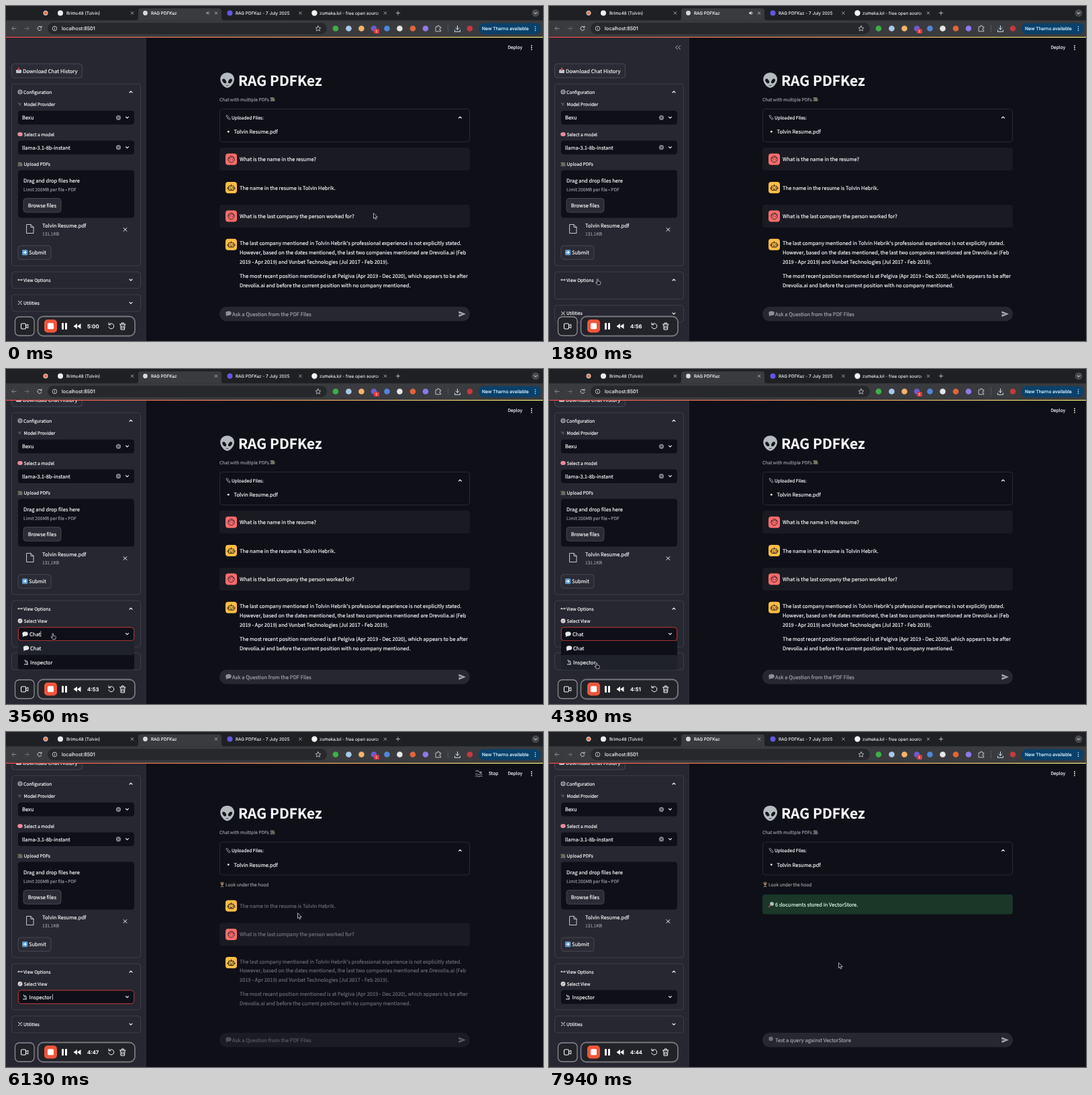
Animation of 800 by 499 pixels, one loop 8000 ms. Source, as an HTML page:

```html
<!DOCTYPE html>
<html lang="en">
<head>
<meta charset="utf-8">
<title>RAG PDFKez</title>
<style>
html, body { margin: 0; width: 100%; height: 100%; overflow: hidden; background: #0e0f17; }
svg { display: block; width: 100%; height: 100%; }
text { white-space: pre; text-rendering: geometricPrecision; font-family: "Noto Sans CJK JP", "Noto Sans CJK SC", "Noto Sans CJK", "Open Sans", sans-serif; }
.ui { font-family: Inter, Roboto, sans-serif; }
</style>
</head>
<body>
<svg id="stage" viewBox="0 0 800 499" preserveAspectRatio="none" xmlns="http://www.w3.org/2000/svg"></svg>
<script>
const LOOP = 8000, BODY = 7.58, SMALL = 6.63;
const INK = '#fafafa', DIM = '#9b9ca3', BG = '#0e0f17', SIDE = '#262730', EDGE = '#484952', RED = '#ff4b4b';

// markup helpers
const text = (x, y, s, size = BODY, fill = INK, more = '') =>
  `<text x="${x}" y="${y}" font-size="${size}" fill="${fill}" stroke="${fill}" stroke-width=".16" ${more}>${s}</text>`;
const small = (x, y, s, fill = INK) => text(x, y, s, SMALL, fill);
const ui = (x, y, s, size, fill = '#dfe0e2', weight = 400) =>
  text(x, y, s, size, fill, `class="ui" font-weight="${weight}"`);
const rect = (x, y, x2, y2, r, fill, stroke = 'none', w = 0.7, more = '') =>
  `<rect x="${x}" y="${y}" width="${x2 - x}" height="${y2 - y}" rx="${r}" fill="${fill}" stroke="${stroke}" stroke-width="${w}" ${more}/>`;
const dot = (x, y, r, fill, stroke = 'none', w = 1) =>
  `<circle cx="${x}" cy="${y}" r="${r}" fill="${fill}" stroke="${stroke}" stroke-width="${w}"/>`;
const oval = (x, y, rx, ry, fill, turn = 0) =>
  `<ellipse cx="${x}" cy="${y}" rx="${rx}" ry="${ry}" fill="${fill}" transform="rotate(${turn} ${x} ${y})"/>`;
const line = (d, stroke = INK, w = 1, fill = 'none') =>
  `<path d="${d}" fill="${fill}" stroke="${stroke}" stroke-width="${w}" stroke-linecap="round" stroke-linejoin="round"/>`;
const shape = (d, fill) => `<path d="${d}" fill="${fill}"/>`;
const group = (id, s) => `<g id="${id}">${s}</g>`;

const cross = (x, y, r, c = '#c9cacc', w = 0.8) => line(`M${x - r} ${y - r}l${2 * r} ${2 * r}m0 ${-2 * r}l${-2 * r} ${2 * r}`, c, w);
const chevron = (x, y, up) => line(`M${x - 2} ${y + (up ? 1 : -1)}l2 ${up ? -2 : 2}l2 ${up ? 2 : -2}`, INK, 1.1);
const box = (x, y, x2, y2) => rect(x, y, x2, y2, 4, 'none', EDGE);
const button = (x, y, x2, y2) => rect(x, y, x2, y2, 4, '#2a2b34', '#55565f');
const field = (y, s) => rect(18, y, 191, y + 20.5, 4, BG) + s + chevron(180.5, y + 10.2);
const clearX = y => dot(167.5, y, 3.6, '#84858c') + cross(167.5, y, 1.3, BG);

// small pictograms
const bubble = (x, y, c = '#e8e8ea') => oval(x, y, 4.2, 3.3, c) + shape(`M${x - 3} ${y + 1}l-1 3.4l4-1.4z`, c);
const books = (x, y) => rect(x, y - 3, x + 6, y - 1, .5, '#587a60') + rect(x + 1, y - 1, x + 7, y + 1, .5, '#8a7355') + rect(x, y + 1, x + 7, y + 3, .5, '#606d76');
const scope = (x, y) => line(`M${x - 1.8} ${y - 3.2}l1.6 3.4M${x - 2.5} ${y + 3.2}h5M${x + .5} ${y - 2}q3 2.4 .6 5`, '#bfc6cc', 1.2);
const clip = (x, y) => line(`M${x - 2} ${y - 1}l3 4q2 1 2-1l-4-5q-2-1-2 1l3 4`, '#a9abb3', .8);
const eye = (x, y) => oval(x, y, 1.7, 1.3, '#d5d6da') + dot(x, y, .6, '#222');
const lens = (x, y) => dot(x + 1, y - 1, 2.8, '#b9c4cb', '#8d969c', .7) + line(`M${x - 1} ${y + 1}l-2.5 2.5`, '#c05a4d', 1.2);
const alien = shape('M329.6 99.3c-6 0-10.4 4.2-10.4 9.8 0 6.2 6 12.9 10.4 12.9s10.4-6.7 10.4-12.9c0-5.600-4.4-9.8-10.4-9.8z', '#b4babd') +
  oval(325.2, 111.8, 2.4, 3.8, '#15161c', -35) + oval(334, 111.8, 2.4, 3.8, '#15161c', 35) + line('M328.1 118.3q1.5 1 3 0', '#15161c', .8);

const user = y => rect(327, y, 344, y + 17, 4, '#ff6c6c') + dot(335.5, y + 8.5, 4.6, 'none', '#33202a', 1) +
  line(`M331.5 ${y + 7}q4 0 5-2q1 2 3 2`, '#33202a', .9) + dot(333.8, y + 9.2, .7, '#33202a') + dot(337.2, y + 9.2, .7, '#33202a');
const bot = y => rect(327, y, 344, y + 17, 4, '#ffbd45') + rect(331.5, y + 6, 339.5, y + 12.5, 1.5, 'none', '#33291a', 1.1) +
  line(`M335.5 ${y + 6}v-2M330 ${y + 8.5}v2M341 ${y + 8.5}v2M334 ${y + 11}h3`, '#33291a', 1) + dot(333.8, y + 8.8, .8, '#33291a') + dot(337.2, y + 8.8, .8, '#33291a');

function browser() {
  const bar = '#3a3b3e', glyph = '#d0d1d3';
  const exts = [[491, '#3fae49'], [510.5, '#a9c8e6'], [529.5, '#f2b46a'], [548, '#6d5bd0'], [567.5, '#4f86d9'],
    [586.5, '#e6e6e6'], [606, '#e2653a'], [625, '#8f78e8'], [691, '#c23a3f']];
  let s = rect(0, 0, 800, 22, 0, '#1f2023') + rect(0, 21.4, 800, 46, 0, bar) +
    shape('M193 21.5q4 0 4-4v-10q0-4 4-4h116q4 0 4 4v10q0 4 4 4z', bar);
  s += dot(59, 10.5, 3.2, '#e07a5c', '#d8d4d2', 1) + dot(81, 10.5, 4, '#eeeeee') + dot(207.5, 10.5, 3.4, '#d9d9dc') +
    dot(333.5, 10.5, 4, '#6157e0') + dot(459.5, 10.5, 4.2, '#f4f4f4');
  s += ui(90, 12.9, 'Brimo48 (Tolvin)', 6.4) + ui(216, 12.9, 'RAG PDFKez', 6.4, '#f2f2f2') +
    ui(342, 12.9, 'RAG PDFKez - 7 July 2025', 6.4) +
    `<g clip-path="url(#tab)">${ui(467, 12.9, 'zumeka.lol - free open source f', 6.4)}</g>`;
  s += [188, 313, 438.5, 565].map(x => cross(x, 10.5, 1.8)).join('') + line('M581.2 10.5h5.6M584 7.7v5.6', glyph, .8);
  s += dot(789, 10.5, 5.5, '#47484c') + line('M787 9.7l2 2l2-2');
  s += line('M15 33.5h-6m2.5-2.7l-2.7 2.7l2.7 2.7', '#86878a') + line('M28 33.5h6m-2.5-2.7l2.7 2.7l-2.7 2.7', '#6c6d70') +
    line('M52.3 31.4a3 3 0 1 0 .6 3M53 30v2h-2', glyph);
  s += rect(62, 25, 478, 42, 8.5, '#27282b') + dot(72.5, 33.5, 3.3, 'none', glyph, .9) + line('M72.5 33.2v1.8M72.5 31.7v.1', glyph, .8);
  s += ui(83, 36, 'localhost:8501', 7.3, '#eeeeef');
  s += line('M465 29.6l1.2 2.5l2.7.3l-2 1.9l.6 2.8l-2.5-1.4l-2.5 1.4l.6-2.8l-2-1.9l2.7-.3z', glyph, .8);
  s += exts.map(([x, c]) => dot(x, 33.5, 4.3, c)).join('') + rect(548, 34, 556, 41, 1.5, '#d93b41') + ui(550.4, 39.7, '1', 5.5, '#fff');
  s += line('M640.5 31h2.2q-.6-2 1.3-2t1.3 2h2.4v2.4q-2-.6-2 1.2t2 1.2v2h-7.2z', glyph, .9) + rect(658, 28, 658.7, 39, 0, '#5f6063');
  s += line('M672.5 29.5v5.5m-2.5-2.3l2.5 2.4l2.5-2.4M668.5 36v2.2h8v-2.2', '#cfe3f7');
  s += rect(704, 25.5, 797, 42, 8, '#0a416a') + ui(709, 36, 'New Tharno available', 6.75, '#cbe8fb', 500) +
    [30.8, 33.6, 36.4].map(y => dot(788.5, y, .8, '#cbe8fb')).join('');
  return s + rect(0, 46, 800, 47.1, 0, 'url(#rainbow)');
}

function sidebar() {
  let s = group('fold', line('M191.5 59l-2.8 2.8l2.8 2.8M195.5 59l-2.8 2.8l2.8 2.8', '#b8b9be'));
  s += button(8.5, 86, 113.5, 107) + rect(15, 95, 23, 100, 1, '#b9c5d0') + line('M19 92v4m-1.5-1.5l1.5 1.5l1.5-1.5', '#e2574c', 1.3) +
    text(25, 99.6, 'Download Chat History');
  s += box(8.5, 116, 200.5, 387) + dot(21, 128, 3, '#6b6d76', '#a5a7af', 1.2) + small(26, 130.7, 'Configuration') + chevron(186, 128, true);
  s += line('M18.5 144.5l3 3M22 145l-2 2.5', '#55575f', 1.5) + small(26.5, 149.4, 'Model Provider') +
    field(156, text(24, 169.2, 'Bexu') + clearX(166.3));
  s += oval(21, 191, 3.8, 3.1, '#e98c9b') + small(26.5, 193.7, 'Select a model') +
    field(200.5, text(24, 213.6, 'llama-3.1-8b-instant') + clearX(210.7));
  s += books(17.5, 235.7) + small(26.5, 238.3, 'Upload PDFs') + rect(18, 244.5, 191, 315.5, 4, BG);
  s += text(26, 262.7, 'Drag and drop files here') + small(26, 275.7, 'Limit 200MB per file • PDF', DIM) +
    button(26, 286.5, 82, 307.3) + text(32.7, 299.8, 'Browse files');
  s += line('M31 325.5h6l4 4v9h-10zM37 325.5v4h4', '#c9cad0') + text(54, 330.4, 'Tolvin Resume.pdf') +
    small(54, 342.2, '131.1KB', DIM) + cross(177.5, 333, 2.4, INK, 1);
  s += button(18, 357, 67, 377.6) + rect(24, 363, 32.3, 371.2, 1.5, '#5b9bd0') + line('M26 367.1h4m-1.6-1.6l1.6 1.6l-1.6 1.6', '#fff', 1.1) + text(34, 370.2, 'Submit');
  s += rect(8.5, 396, 200.5, 420.5, 4, 'none', EDGE, .7, 'id="frame"') + eye(19, 408) + eye(23, 408) + small(26, 410.7, 'View Options') +
    group('viewUp', chevron(186, 408, true)) + group('viewDown', chevron(186, 408));
  s += group('viewBody', dot(21, 426.2, 3.4, '#d4d6db') + line('M19.6 427.6l2.8-2.8', '#c2564f') + small(26.5, 429, 'Select View') +
    field(435.5, group('optChat', bubble(28.5, 445.5) + text(35, 449.2, 'Chat')) + group('optInspect', scope(28, 445.7) + text(34.5, 449.2, 'Inspector'))) +
    group('focus', rect(18.3, 435.8, 190.7, 455.7, 4, 'none', '#d8423f', .9)) + rect(69, 441.5, 69.7, 450, 0, INK, 'none', 0, 'id="caret"'));
  s += group('utils', box(8.5, 430, 200.5, 455) + line('M18.5 439.5l5 5M23.5 439.5l-5 5', '#a9b0b7', 1.1) + small(26, 444.7, 'Utilities') + chevron(186, 442.3));
  s += group('menu', rect(18, 456, 191, 498.5, 3, BG) + rect(18, 456, 191, 477, 3, '#20222b', 'none', 0, 'id="hover"') +
    bubble(30, 466.5) + text(36, 470.2, 'Chat') + scope(30, 487.7) + text(36, 491.2, 'Inspector'));
  return s;
}

function page() {
  const answer = ["The last company mentioned in Tolvin Hebrik's professional experience is not explicitly stated.",
    'However, based on the dates mentioned, the last two companies mentioned are Drevolia.ai (Feb',
    '2019 - Apr 2019) and Vunbet Technologies (Jul 2017 - Feb 2019).',
    'The most recent position mentioned is at Pelgiva (Apr 2019 - Dec 2020), which appears to be after',
    'Drevolia.ai and before the current position with no company mentioned.'];
  const rows = [356.4, 370, 383.6, 405, 418.6];
  const hint = '#a6a7ae', run = '#a7a8ae', card = '#1a1b22';
  const head = alien + text(346, 119, 'RAG PDFKez', 20.9, INK, 'font-weight="700"') +
    small(318, 141.8, 'Chat with multiple PDFs', DIM) + books(393.5, 139) +
    rect(318.5, 153.5, 690.5, 202.5, 4, 'none', '#353640') + clip(331, 166) + small(336, 168.7, 'Uploaded Files:') + chevron(676.5, 166, true) +
    dot(331.3, 187.2, 1.4, INK) + text(339.5, 190.2, 'Tolvin Resume.pdf');
  const chat = group('first', rect(318, 211, 691, 245, 4, card) + user(219.7) + text(348, 231.2, 'What is the name in the resume?')) +
    group('rest', bot(262) + rect(318, 296, 691, 330, 4, card) + user(304.5) + bot(346.7) +
      group('words', text(348, 273.6, 'The name in the resume is Tolvin Hebrik.') +
        text(348, 315.8, 'What is the last company the person worked for?') + answer.map((s, i) => text(348, rows[i], s)).join('')));
  const hood = dot(322, 226.5, 1.9, '#a98a6e') + shape('M318.5 225.6h7l-1.5-2.2h-4zM319 231q3-4.500 6 0z', '#6a5f50') + small(327, 230, 'Look under the hood', DIM);
  const found = rect(318, 242, 691, 271.5, 4, '#1a3728') + lens(331, 257) + text(337, 260.2, '6 documents stored in VectorStore.', BODY, '#dffde9');
  const input = rect(318, 448, 691, 469.5, 10.7, SIDE) + shape('M674.5 454.5l10.5 4.2l-10.5 4.2v-3.2l6-1l-6-1z', '#a8a9b0') +
    group('ask', bubble(331.5, 457.8, '#8e9097') + text(337, 461.7, 'Ask a Question from the PDF Files', BODY, hint)) +
    group('query', dot(330.5, 457, 3.2, '#70727a') + text(337, 461.7, 'Test a query against VectorStore', BODY, hint));
  const runs = [
    dot(705.5, 57, 1.3, run) + line('M701 60.5l3-1.5l2 1.5l-2 3l2 1.5l-1 3M703.5 63.5l-1.5 2.5h-2.5M706 60.5l2.5 1', run),
    dot(707.5, 60, 1.3, run) + line('M700 58h4l2 3M699.5 63q2-1.5 3.3 0t3.3 0t3.3 0M699.5 66q2-1.5 3.3 0t3.3 0t3.3 0', run),
    dot(701.5, 65, 2.2, 'none', run) + dot(707.5, 65, 2.2, 'none', run) + dot(706, 57, 1.2, run) + line('M704.5 65v-3l-1.5-1.5l2-2l2 1.5h1.5', run)];
  return group('head', head) + group('chat', chat) + group('hood', hood) + group('found', found) + group('input', input) +
    group('busy', runs.map((s, i) => group('run' + i, s)).join('') + small(719, 64.4, 'Stop')) +
    small(747.5, 64.4, 'Deploy') + [59.2, 62, 64.8].map(y => dot(783, y, .9, INK)).join('');
}

function recorder() {
  return rect(13.5, 463, 42, 491, 6, '#222328', '#8b8c90', 1.3) + rect(22.5, 473, 29.5, 481, 1.5, 'none', INK, 1.1) + line('M29.8 476l3-1.8v5.600l-3-1.8') +
    rect(47.5, 462.5, 192, 491.5, 8, '#222328', '#77787d', 1.8) + rect(57, 467, 76, 486.5, 5, '#f0553a') + rect(62, 472.3, 71, 481.3, 1.5, '#fff') +
    rect(83, 472, 86, 482, 1, INK) + rect(88, 472, 91, 482, 1, INK) + shape('M106 473v8l-5.5-4zM111.5 473v8l-5.5-4z', INK) +
    text(121, 479.7, '', 7.8, INK, 'id="clock" class="ui" font-weight="600"') +
    line('M153.5 474.5a4 4 0 1 1-.6 3.5M153 472v2.8h2.8') +
    line('M169.5 474h8.5M172.3 473.7v-1.7h3v1.7M170.5 474.5l.6 7.5h5.4l.6-7.5M172.6 476.5v3.5M175 476.5v3.5');
}

const pointers = group('arrow', line('M0 0v7.6l1.8-1.6l1.2 2.8l1.4-.6l-1.2-2.7h2.3z', '#e8e8ea', .7, '#101114')) +
  group('hand', line('M-1 0q1-1 1.6 0v3l3.2.8q.8.4.5 1.5l-.8 3h-4l-2.5-3.3q.5-1 2 .2z', '#e8e8ea', .7, '#101114')) +
  group('beam', line('M-1.7-4q1.7 0 1.7 1.2v5.6q0 1.2-1.7 1.2M1.7-4q-1.7 0-1.7 1.2M0 2.8q0 1.2 1.7 1.2', '#e4e4e6', .9));

document.getElementById('stage').innerHTML = `<defs>
<linearGradient id="rainbow"><stop stop-color="${RED}"/><stop offset="1" stop-color="#fffd80"/></linearGradient>
<clipPath id="tab"><rect x="460" y="0" width="95" height="22"/></clipPath>
<clipPath id="pane"><rect y="46" width="209" height="453"/></clipPath></defs>` +
  rect(0, 0, 800, 499, 0, BG) + page() +
  `<g clip-path="url(#pane)">${rect(0, 46, 209, 499, 0, SIDE)}${group('side', sidebar())}</g>` + browser() +
  group('sound', shape('M298 9.5h1.5l2-1.8v5.6l-2-1.8h-1.5z', '#e6e6e8') + line('M302.8 9q1 1.5 0 3', '#e6e6e8', .7)) +
  recorder() + group('cursor', pointers);

const el = {};
document.querySelectorAll('[id]').forEach(e => el[e.id] = e);
const show = (id, on) => el[id].setAttribute('display', on ? 'inline' : 'none');
const fade = (id, v) => el[id].setAttribute('opacity', v);
const move = (id, x, y) => el[id].setAttribute('transform', `translate(${x} ${y})`);
const ramp = (t, a, b) => Math.max(0, Math.min(1, (t - a) / (b - a)));
const ease = v => v * v * (3 - 2 * v);

const trail = [[150, 547.5, 309], [900, 149.5, 392.5], [1000, 149.5, 392.5], [1600, 75, 406], [2000, 72, 407],
  [2600, 68, 378], [2850, 68, 378], [3200, 70, 392], [3500, 70, 393], [4100, 71, 438], [4600, 71, 438],
  [4980, 352.5, 399], [5200, 356, 392], [6050, 434.5, 270], [6300, 434.5, 270], [7300, 431.5, 344], [8000, 431.5, 344]];

function pointAt(t) {
  const i = trail.findIndex(k => k[0] > t);
  if (i < 1) return trail[0].slice(1);
  const [a, x, y] = trail[i - 1], [b, u, v] = trail[i], p = ease(ramp(t, a, b));
  return [x + (u - x) * p, y + (v - y) * p];
}

const OPEN = 1800, DROP = 3350, PICK = 4600, RERUN = 4760, DONE = 6420, BLUR = 6900;

function update(t) {
  const [x, y] = pointAt(t);
  const grow = ease(ramp(t, OPEN, OPEN + 200)), scroll = 51 * ease(ramp(t, 2100, 2400));
  const rerun = t >= RERUN, done = t >= DONE, picked = t >= PICK, focus = t >= DROP && t < BLUR;

  const left = 300 - Math.floor(t / 500 + 0.85);
  el.clock.textContent = Math.floor(left / 60) + ':' + String(left % 60).padStart(2, '0');
  show('sound', t < 2200);
  fade('sound', t < 500 ? 0.5 : 1);

  move('side', 0, -scroll);
  show('fold', x < 209);
  el.frame.setAttribute('height', 24.5 + 44.5 * grow);
  move('utils', 0, 44 * grow);
  show('viewUp', t >= OPEN);
  show('viewDown', t < OPEN);
  fade('viewBody', ramp(grow, 0.7, 1));
  show('optChat', !picked);
  show('optInspect', picked);
  show('focus', focus);
  show('caret', focus && (t + 50) % 500 < 250);
  el.caret.setAttribute('x', picked ? 69 : 51.5);
  show('menu', t >= DROP && !picked);
  el.hover.setAttribute('y', y > 424 ? 477 : 456);

  move('head', 0, rerun ? 10.4 : 0);
  show('chat', !done);
  show('first', !rerun);
  move('rest', 0, rerun ? -11.6 : 0);
  fade('words', 1 - 0.6 * ramp(t, 4800, 5350));
  show('hood', rerun);
  show('found', done);
  show('ask', !done);
  show('query', done);
  fade('input', done ? 1 : 1 - 0.5 * ramp(t, 5250, 5800));
  show('busy', t >= 4700 && !done);
  const kind = Math.floor(Math.max(0, t - 4700) / 350) % 3;
  for (let i = 0; i < 3; i++) show('run' + i, i === kind);

  const beam = t > 4850 && t < 5600, hand = (t > 1500 && t < 2250) || (t > 3150 && t < 4700);
  move('cursor', x, y);
  show('beam', beam);
  show('hand', hand && !beam);
  show('arrow', !hand && !beam);
}

const start = performance.now();
function tick() {
  update((performance.now() - start) % LOOP);
  requestAnimationFrame(tick);
}
update(0);
requestAnimationFrame(tick);
</script>
</body>
</html>
```
